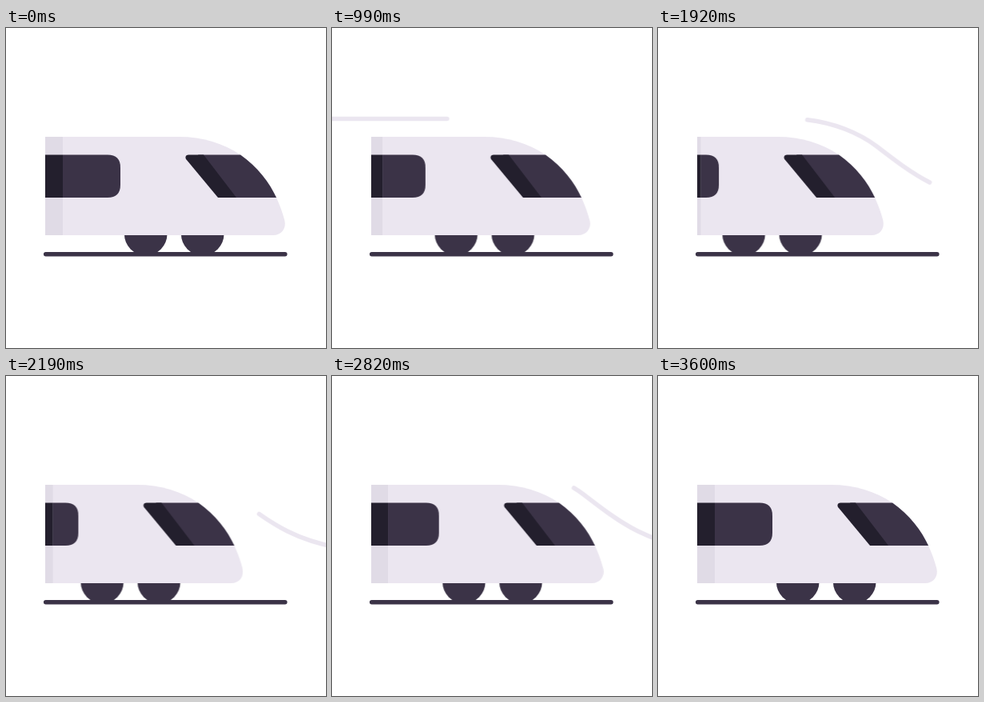
An HTML page without scripts that plays this animation: 400x400 px, repeating every 4630 ms.

```html
<!DOCTYPE html>
<html lang="en">
<head>
<meta charset="utf-8">
<title>Train</title>
<style>
  html, body { margin: 0; width: 100%; height: 100%; overflow: hidden; background: #fff; }
  svg { display: block; width: 100%; height: 100%; }

  .light { fill: #ebe6f0; }
  .shade { fill: #e0dbe6; }
  .dark { fill: #3b3347; }
  .deep { fill: #231f2d; }

  .sway, .wheels, .strip, .gust { animation: 4630ms infinite both; }
  .sway { animation-name: sway; }
  .wheels { animation-name: roll; }
  .strip { animation-name: squeeze; transform-origin: 49px 0; }
  .gust {
    animation-name: blow;
    animation-delay: var(--t);
    fill: none;
    stroke: #ebe6f0;
    stroke-width: 5.5;
    stroke-linecap: round;
    stroke-dasharray: 174 2000;
  }

  .body { --rest: 0px; --front: 15px; --back: -69px; }
  .wind { --rest: -9px; --front: 4px; --back: -58px; }

  @keyframes sway {
    0% { transform: translateX(var(--rest)); animation-timing-function: cubic-bezier(.33, 0, .67, 1); }
    6.05% { transform: translateX(var(--front)); animation-timing-function: cubic-bezier(.33, 0, .67, 1); }
    37.15% { transform: translateX(var(--back)); animation-timing-function: cubic-bezier(.4, 0, .2, 1); }
    77.75%, 100% { transform: translateX(var(--rest)); }
  }
  @keyframes roll {
    0% { transform: none; animation-timing-function: cubic-bezier(.33, 0, .67, 1); }
    7.78% { transform: translateX(18px); animation-timing-function: cubic-bezier(.33, 0, .67, 1); }
    37.8% { transform: translateX(-69px); animation-timing-function: cubic-bezier(.4, 0, .2, 1); }
    77.75%, 100% { transform: none; }
  }
  @keyframes squeeze {
    0%, 8.64% { transform: none; animation-timing-function: cubic-bezier(.33, 0, .67, 1); }
    37.15% { transform: scaleX(.17); animation-timing-function: cubic-bezier(.4, 0, .4, 1); }
    67%, 100% { transform: none; }
  }
  @keyframes blow {
    0% { stroke-dashoffset: -580; animation-timing-function: linear; }
    11.56%, 100% { stroke-dashoffset: 180; }
  }
</style>
</head>
<body>
<svg viewBox="0 0 400 400">
  <defs>
    <clipPath id="cut"><rect x="49" y="100" width="351" height="200"/></clipPath>
    <path id="stream" d="M-40 113.5H222C262 113.5 302 127 330 148C352 165 374 182 398 194C430 210 470 219 520 221"/>
  </defs>

  <g class="wind sway">
    <use href="#stream" class="gust" style="--t:244ms"/>
    <use href="#stream" class="gust" style="--t:608ms"/>
    <use href="#stream" class="gust" style="--t:977ms"/>
    <use href="#stream" class="gust" style="--t:1344ms"/>
    <use href="#stream" class="gust" style="--t:1712ms"/>
    <use href="#stream" class="gust" style="--t:2077ms"/>
    <use href="#stream" class="gust" style="--t:2668ms"/>
    <use href="#stream" class="gust" style="--t:3039ms"/>
  </g>

  <g class="wheels dark">
    <circle cx="174.7" cy="257.5" r="26.8"/>
    <circle cx="245.7" cy="257.5" r="26.8"/>
  </g>
  <path d="M49.7 282.8H348.8" stroke="#3b3347" stroke-width="5.5" stroke-linecap="round"/>

  <g clip-path="url(#cut)">
    <g class="body sway">
      <path class="light" d="M-60 136H217C245 136 271 144 293 158.5C315 174 329 193 338 212C343 223 346 232 348.4 241C350.5 251 344 259 334 259H-60Z"/>
      <path class="dark" d="M-60 158.5H127Q143 158.5 143 174.5V196Q143 212 127 212H-60Z"/>
      <path class="dark" d="M240 158.5H293C315 174 329 193 338 212H280Z"/>
      <path class="deep" d="M228 158.5H247L288 212H265L225.3 164.3C223.3 161.5 225 158.5 228 158.5Z"/>
    </g>
    <g class="strip">
      <path class="shade" d="M49 136H71V259H49Z"/>
      <path class="deep" d="M49 158.5H71V212H49Z"/>
    </g>
  </g>
</svg>
</body>
</html>
```
